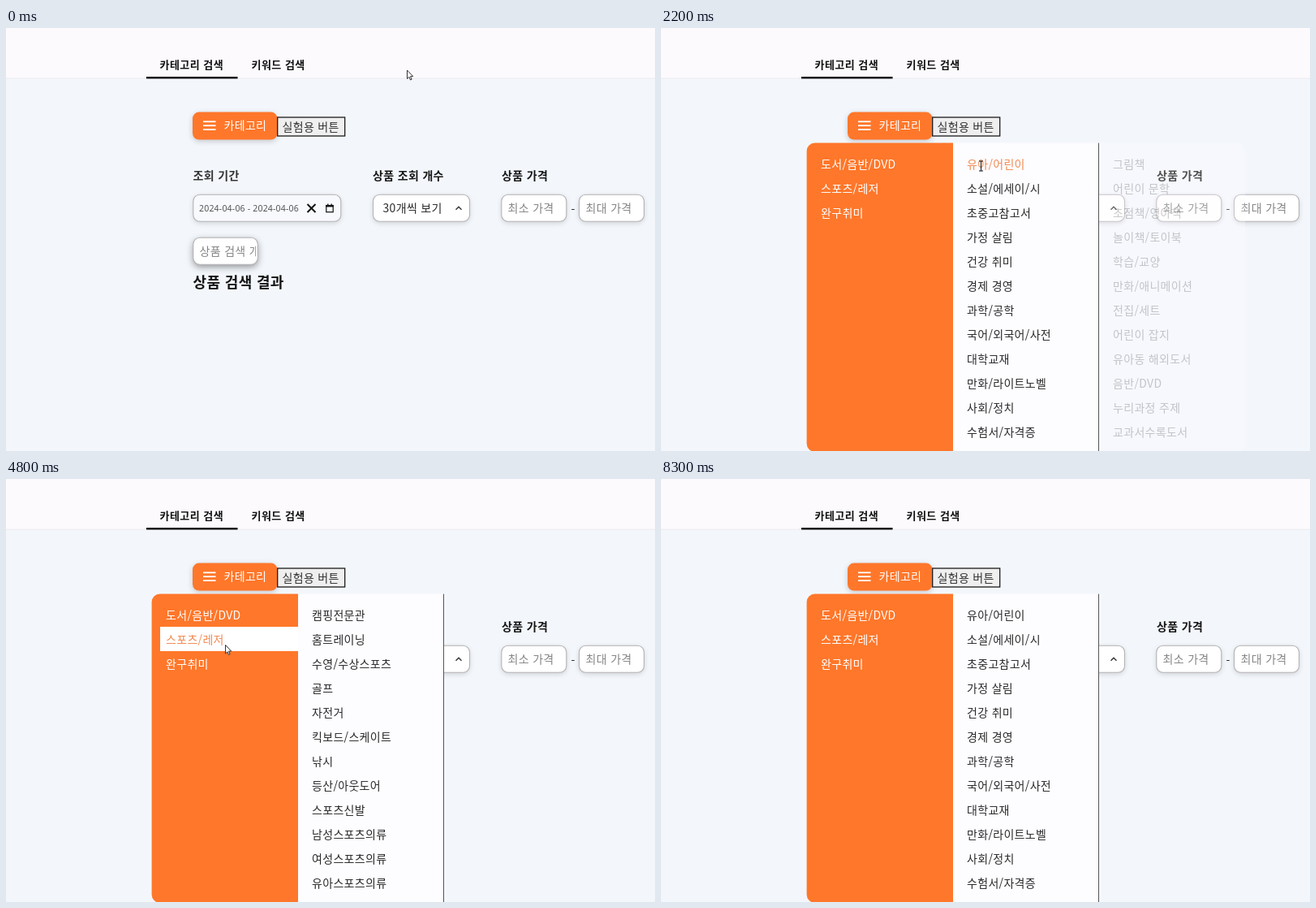
These frames come from a looping animation (800x521 px, 9300 ms). An HTML page with a canvas:

```html
<!DOCTYPE html>
<html lang="ko">
<head>
<meta charset="utf-8">
<title>카테고리 검색</title>
<style>
  html, body { margin: 0; width: 100%; height: 100%; overflow: hidden; background: #f3f7fc; }
  canvas { display: block; width: 800px; height: 521px; }
</style>
</head>
<body>
<canvas id="stage"></canvas>
<script>
const W = 800, H = 521, LOOP = 9300, STEP = 100, GLIDE = 300;
const ORANGE = '#ff772a', HOVER = '#f28a52', PANEL = '#fdfcff';
const INK = '#2a2a2a', BLACK = '#161616', HINT = '#858585';
const TOP = 141.6, ROW_TOP = 152, ROW = 30, COL = 180;
const FONT = '"Noto Sans CJK KR", "Noto Sans CJK JP", "Noto Sans CJK", sans-serif';

const canvas = document.getElementById('stage');
const ctx = canvas.getContext('2d');
const dpr = window.devicePixelRatio || 1;
canvas.width = W * dpr;
canvas.height = H * dpr;

const roots = ['도서/음반/DVD', '스포츠/레저', '완구취미'];
const books = ['유아/어린이', '소설/에세이/시', '초중고참고서', '가정 살림', '건강 취미', '경제 경영',
  '과학/공학', '국어/외국어/사전', '대학교재', '만화/라이트노벨', '사회/정치', '수험서/자격증'];
const sports = ['캠핑전문관', '홈트레이닝', '수영/수상스포츠', '골프', '자전거', '킥보드/스케이트',
  '낚시', '등산/아웃도어', '스포츠신발', '남성스포츠의류', '여성스포츠의류', '유아스포츠의류'];
const toys = ['신생아/영아완구', '로봇/작동완구', '블록놀이', '역할놀이', '인형', '야외완구',
  '물놀이', '보드게임', '드론', '조립모형', '피규어', '퍼즐'];
const kidsBooks = ['그림책', '어린이 문학', '초점책/영아책', '놀이책/토이북', '학습/교양', '만화/애니메이션',
  '전집/세트', '어린이 잡지', '유아동 해외도서', '음반/DVD', '누리과정 주제', '교과서수록도서'];
const training = ['스트레칭/마사지', '유산소', '근력', '보호대/체중계'];

const columnX = col => COL * (col + 1);
const cell = (col, row, dx) => ({ x: columnX(col) + dx, y: ROW_TOP + ROW * row });

// Pointer glides: start time and destination
const home = { x: 494, y: 52 };
const glides = [
  [100, { x: 288, y: 124 }],
  [1100, cell(0, 0.6, 125)],
  [2000, cell(1, 0.6, 65)],
  [2600, cell(2, 0.5, 30)],
  [2950, cell(2, 11.5, 45)],
  [3300, cell(2, 0.7, 35)],
  [3700, cell(1, 0.9, 11)],
  [4100, cell(0, 0.6, 140)],
  [4300, cell(0, 1.75, 90)],
  [5000, cell(1, 1.6, 65)],
  [5600, cell(2, 0.6, 40)],
  [5800, cell(2, 3.3, 45)],
  [6000, cell(1, 1.53, 7)],
  [6300, cell(0, 1.6, 92)],
  [6900, cell(0, 2.5, 90)],
  [7900, { x: 420, y: 40 }]
];

const ramp = (t, a, b) => Math.min(1, Math.max(0, (t - a) / (b - a)));
const ease = k => k * k * (3 - 2 * k);
const mix = (a, b, k) => a + (b - a) * k;

function pointerAt(t) {
  if (t >= 8300) return null;
  return glides.reduce((p, [start, to]) => {
    const k = ease(ramp(t, start, start + GLIDE));
    return { x: mix(p.x, to.x, k), y: mix(p.y, to.y, k) };
  }, home);
}

function setFont({ size = 14, weight = 400, gap = 0.32, family = FONT } = {}) {
  ctx.font = `${weight} ${size}px ${family}`;
  ctx.letterSpacing = gap + 'px';
  ctx.wordSpacing = family === FONT ? '0.8px' : '0px';
}

// Left-aligned text, vertically centred on cy
function text(str, x, cy, color = INK, style = {}) {
  setFont(style);
  ctx.fillStyle = color;
  ctx.fillText(str, x, cy + (style.size || 14) * 0.34);
}

function rect(x, y, w, h, color) {
  ctx.fillStyle = color;
  ctx.fillRect(x, y, w, h);
}

function box(x, y, w, h, r, fill) {
  ctx.beginPath();
  ctx.roundRect(x, y, w, h, r);
  ctx.fillStyle = fill;
  ctx.fill();
}

function shadowBox(x, y, w, h, fill, alpha, blur, dy) {
  ctx.save();
  ctx.shadowColor = `rgba(0,0,0,${alpha})`;
  ctx.shadowBlur = blur * dpr;
  ctx.shadowOffsetY = dy * dpr;
  box(x, y, w, h, 8, fill);
  ctx.restore();
}

function field(x, y, w, fill = '#fff', alpha = 0.16, blur = 6, dy = 2) {
  shadowBox(x, y, w, 33, fill, alpha, blur, dy);
  ctx.strokeStyle = '#b5b3b5';
  ctx.lineWidth = 1.1;
  ctx.stroke();
}

function line(points, width, color = '#111') {
  ctx.beginPath();
  points.forEach(([x, y]) => ctx.lineTo(x, y));
  ctx.strokeStyle = color;
  ctx.lineWidth = width;
  ctx.stroke();
}

function drawHeader() {
  rect(0, 0, W, H, '#f3f7fc');
  rect(0, 0, W, 62, '#fcfafd');
  rect(0, 61.6, W, 1, '#ebecf0');
  rect(173, 60, 112.5, 2.4, '#000');
  const tab = { size: 13, weight: 700, gap: 0.45 };
  text('카테고리 검색', 189.5, 45.3, '#111', tab);
  text('키워드 검색', 302.5, 45.3, '#111', tab);
}

function drawButtons() {
  shadowBox(230, 103.6, 104.5, 34, ORANGE, 0.2, 7, 2);
  for (let i = -1; i < 2; i++) line([[243, 120.2 + 4.9 * i], [258.5, 120.2 + 4.9 * i]], 1.8, '#fff');
  text('카테고리', 268.5, 120.7, '#fff');

  rect(335, 110, 83, 23.5, '#efefef');
  ctx.strokeStyle = '#1c1c1c';
  ctx.lineWidth = 1.3;
  ctx.strokeRect(334.7, 110, 83, 23);
  text('실험용 버튼', 340.5, 122.2, '#333');
}

function drawCross(x, y, r) {
  line([[x - r, y - r], [x + r, y + r]], 1.9);
  line([[x + r, y - r], [x - r, y + r]], 1.9);
}

function drawCalendar(x, y) {
  ctx.strokeStyle = '#111';
  ctx.lineWidth = 1.2;
  ctx.strokeRect(x - 4.2, y - 3.5, 8.4, 8.2);
  line([[x - 4.8, y - 2.8], [x + 4.8, y - 2.8]], 2.4);
  for (const dx of [-2.2, 2.2]) line([[x + dx, y - 5.5], [x + dx, y - 3]], 1.3);
}

function drawForm() {
  const bold = { weight: 700 };
  text('조회 기간', 230.5, 182, '#333', bold);
  text('상품 조회 개수', 452, 182, BLACK, bold);
  text('상품 가격', 611, 182, BLACK, bold);

  const y = 205.2, mid = 222;
  field(230.8, y, 182, '#f7f9fd');
  text('2024-04-06 - 2024-04-06', 238, mid + 0.6, '#4a4a4a',
    { size: 10.5, gap: 0.2, family: '"Open Sans", sans-serif' });
  drawCross(376.5, mid, 5);
  drawCalendar(399, mid);

  field(452.5, y, 119);
  text('30개씩 보기', 464.5, mid + 0.7);
  line([[554.5, mid + 1.7], [558, mid - 1.8], [561.5, mid + 1.7]], 1.4, '#333');

  field(610.8, y, 80);
  text('최소 가격', 618.5, mid + 0.4, HINT);
  text('-', 696.5, mid + 0.4);
  field(706.5, y, 80);
  text('최대 가격', 714.5, mid + 0.4, HINT);

  field(230.8, 258.3, 79.5, '#fff', 0.42, 8, 3);
  ctx.save();
  ctx.beginPath();
  ctx.rect(238, 260, 70, 30);
  ctx.clip();
  text('상품 검색 개수', 238.5, 275.3, HINT);
  ctx.restore();

  text('상품 검색 결과', 230.5, 313.4, BLACK, { size: 18, weight: 700, gap: 0.4 });
}

function hoverAt(p) {
  if (!p || p.x < 190 || p.x >= columnX(3) || p.y < ROW_TOP) return null;
  return { col: Math.floor(p.x / COL) - 1, row: Math.floor((p.y - ROW_TOP) / ROW) };
}

function drawColumn(col, alpha, items, hover) {
  if (alpha <= 0) return;
  const x = columnX(col), r = 10;
  const radii = [[r, 0, 0, r], 0, [0, r, r, 0]][col];
  ctx.globalAlpha = alpha;
  box(x - (col ? 0 : 0.4), TOP, COL + (col ? 0 : 0.4), H + 1 - TOP, radii, col ? PANEL : ORANGE);
  if (col === 1) rect(x + COL - 1, TOP, 1, H - TOP, '#555');
  items.forEach((item, row) => {
    const y = ROW_TOP + ROW * row;
    const over = hover && hover.col === col && hover.row === row;
    if (over && !col) rect(x + 10, y, COL - 10, ROW, '#fff');
    text(item, x + 17, y + 16.3, over ? HOVER : col ? INK : '#fff');
  });
  ctx.globalAlpha = 1;
}

function drawArrow({ x, y }) {
  ctx.beginPath();
  [[0, 0], [0, 10.5], [2.4, 8.3], [4, 12], [5.6, 11.3], [4, 7.7], [7.2, 7.5]]
    .forEach(([dx, dy]) => ctx.lineTo(x + 0.5 + dx, y + dy));
  ctx.closePath();
  ctx.fillStyle = '#fff';
  ctx.fill();
  ctx.strokeStyle = '#333';
  ctx.lineWidth = 1;
  ctx.stroke();
}

function drawBeam({ x, y }) {
  x = Math.round(x) + 0.5;
  line([[x, y - 6], [x, y + 6]], 1);
  for (const dy of [-6, 6]) line([[x - 2.5, y + dy], [x + 2.5, y + dy]], 1);
}

function overText(p, hover, lists) {
  const item = hover && lists[hover.col][hover.row];
  if (!item) return false;
  setFont();
  const start = cell(hover.col, hover.row + 0.5, 17);
  return p.x >= start.x && p.x < start.x + ctx.measureText(item).width && Math.abs(p.y - start.y) < 10;
}

function render(t) {
  const p = pointerAt(t);
  const late = t >= 4600;
  const alphas = [
    ramp(t, 500, 900),
    ramp(t, 1200, 1700),
    late ? ramp(t, 5100, 5500) - ramp(t, 6400, 6700) : ramp(t, 2100, 2500) - ramp(t, 4200, 4500)
  ];
  const lists = [
    roots,
    t < 4500 || t >= 8000 ? books : t < 7000 ? sports : toys,
    late ? training : kidsBooks
  ];
  const hover = alphas[0] === 1 ? hoverAt(p) : null;

  ctx.setTransform(dpr, 0, 0, dpr, 0, 0);
  drawHeader();
  drawButtons();
  drawForm();
  alphas.forEach((alpha, col) => drawColumn(col, alpha, lists[col], hover));
  if (p) (overText(p, hover, lists) ? drawBeam : drawArrow)(p);
}

const start = performance.now();
function tick() {
  const t = (performance.now() - start) % LOOP;
  render(Math.floor(t / STEP) * STEP);
  requestAnimationFrame(tick);
}
tick();
</script>
</body>
</html>
```
